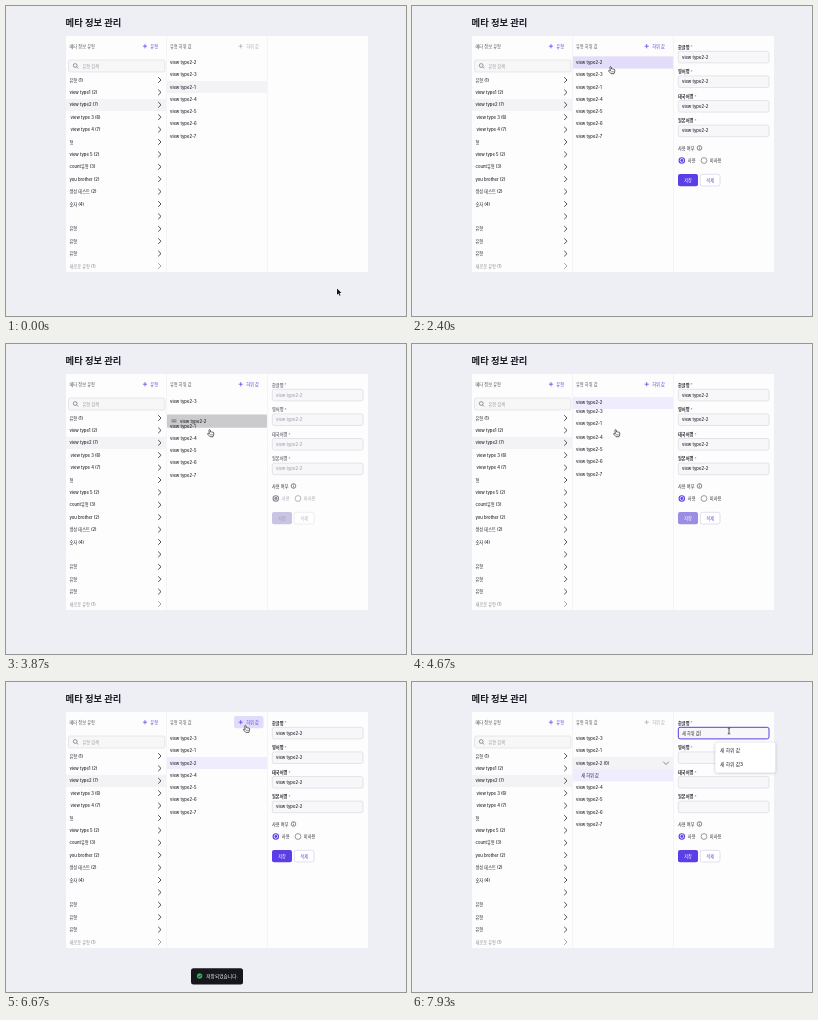
An HTML page with a canvas that plays this animation: 400x310 px, repeating every 8000 ms.

```html
<!DOCTYPE html>
<html lang="ko">
<head>
<meta charset="utf-8">
<style>
html, body { margin: 0; width: 100%; height: 100%; overflow: hidden; background: #eeeff5; }
canvas { display: block; width: 400px; height: 310px; }
</style>
</head>
<body>
<canvas id="stage"></canvas>
<script>
const LOOP = 8000;
const PURPLE = '#5b3ee6', INK = '#24252b', GREY = '#a9aab2', SHADE = '#f3f3f6';
const PICK = '#efecfd', PICK_HOVER = '#e3ddfa';
const FONT = 'Inter, "Noto Sans CJK KR", "Noto Sans CJK", sans-serif';
const ROW = 12.25, FIRST = 56.5;

// Moments of the story, in ms
const T = { pick: 2000, form: 2300, drag: 3530, drop: 4500, enable: 4560, sort: 4750,
            toast: 4780, press: 6470, add: 6850, toastEnd: 7080, focus: 7730, menu: 7800 };

const canvas = document.getElementById('stage');
const g = canvas.getContext('2d');
const dpr = window.devicePixelRatio || 1;
canvas.width = 400 * dpr;
canvas.height = 310 * dpr;

const clamp = v => Math.max(0, Math.min(1, v));
const ramp = (t, a, b) => clamp((t - a) / (b - a));
const lerp = (a, b, p) => a + (b - a) * p;
const smooth = p => p * p * (3 - 2 * p);
const easeOut = p => 1 - (1 - p) * (1 - p);

function mix(a, b, p) {
  const part = (c, i) => parseInt(c.slice(i, i + 2), 16);
  return `rgb(${[1, 3, 5].map(i => Math.round(lerp(part(a, i), part(b, i), p)))})`;
}

function text(s, x, y, color = INK, size = 4.2, weight = 500) {
  g.font = `${weight} ${size}px ${FONT}`;
  g.fillStyle = color;
  g.fillText(s, x, y + size * 0.36);
}

function rect(x, y, w, h, fill) {
  g.fillStyle = fill;
  g.fillRect(x, y, w, h);
}

function box(x, y, w, h, r, fill, stroke, width = 0.6) {
  g.beginPath();
  g.roundRect(x, y, w, h, r);
  if (fill) { g.fillStyle = fill; g.fill(); }
  if (stroke) { g.strokeStyle = stroke; g.lineWidth = width; g.stroke(); }
}

function line(points, color, width) {
  g.beginPath();
  points.forEach(([x, y]) => g.lineTo(x, y));
  g.strokeStyle = color;
  g.lineWidth = width;
  g.stroke();
}

function disc(x, y, r, fill, stroke, width) {
  g.beginPath();
  g.arc(x, y, r, 0, 7);
  if (fill) { g.fillStyle = fill; g.fill(); }
  if (stroke) { g.strokeStyle = stroke; g.lineWidth = width; g.stroke(); }
}

function plus(x, y, color) {
  line([[x - 2.1, y], [x + 2.1, y]], color, 0.75);
  line([[x, y - 2.1], [x, y + 2.1]], color, 0.75);
}

const path = [
  [70, 331, 282.5], [870, 203, 61], [1000, 203, 61], [1330, 198.5, 60.5],
  [3130, 198.5, 60.5], [3440, 203.5, 77], [3530, 203.5, 77], [3860, 203.5, 85.5],
  [4830, 203.5, 85.5], [5640, 236, 47], [5730, 236, 47], [6070, 239, 43.5],
  [6300, 239, 43.5], [6330, 239.3, 43.2], [7300, 239.3, 43.2], [7700, 317, 49]
];

function pointer(t) {
  const i = path.findIndex(k => k[0] > t);
  if (i < 0) return path[path.length - 1].slice(1);
  if (i === 0) return path[0].slice(1);
  const a = path[i - 1], b = path[i], p = smooth(ramp(t, a[0], b[0]));
  return [lerp(a[1], b[1], p), lerp(a[2], b[2], p)];
}

const types = ['유형 (1)', 'view type1 (2)', 'view type2 (7)', ' view type 3 (6)',
  ' view type 4 (7)', '형', 'view type 5 (2)', 'count유형 (3)', 'you brother (2)',
  '생성 테스트 (2)', '숫자 (4)', '', '유형', '유형', '유형', '새로운 유형 (1)'];

function drawTypes() {
  text('메타 정보 유형', 63.5, 40.3, '#55565e');
  plus(139, 40.2, PURPLE);
  text('유형', 144.3, 40.3, PURPLE);
  box(62.5, 54, 96.5, 12, 2, '#f7f7f8', '#d9d9de');
  disc(69.2, 59.5, 1.9, null, '#55565e', 0.6);
  line([[70.6, 60.9], [72.2, 62.5]], '#55565e', 0.6);
  text('유형 검색', 76.5, 60.2, '#9b9ca4');
  types.forEach((name, i) => {
    const y = 74 + i * 12.4;
    const color = i === types.length - 1 ? '#8f9097' : INK;
    if (i === 2) rect(60, y - 6, 100, 12.2, SHADE);
    text(name, 63.5, y, color);
    line([[152.2, y - 2.8], [155, y], [152.2, y + 2.8]], color, 0.8);
  });
}

function drawRow(name, y, fill, x = 164) {
  if (fill) rect(161, y - 6.1, 100, 12.2, fill);
  text(name, x, y);
}

function hoverAt(t, [x, y]) {
  if (t >= T.drag && t < T.sort) return -1;
  if (t > 3130 && t < T.drag) return t > 3250 ? 1 : 0;
  return x > 161 && x < 261 ? Math.floor((y - FIRST + ROW / 2) / ROW) : -1;
}

function drawValues(t, pos) {
  const live = ramp(t, T.pick, T.pick + 130) * (1 - ramp(t, T.add, T.add + 100));
  const hot = ramp(t, T.press, T.press + 130) * (1 - ramp(t, T.add, T.add + 130));
  const color = mix(GREY, PURPLE, live);
  text('유형 하위 값', 164, 40.3, '#55565e');
  if (hot) box(228, 34, 29.5, 12.3, 2, mix('#fdfdfe', '#e2dcfb', hot));
  plus(234.7, 40.2, color);
  text('하위 값', 240.2, 40.3, color);

  const label = n => 'view type2-' + n;
  const at = i => FIRST + i * ROW;
  const hover = hoverAt(t, pos);

  if (t < T.drag) {
    [2, 3, 1, 4, 5, 6, 7].forEach((n, i) => {
      let fill = i === hover || (n === 1 && t < 2270) ? SHADE : null;
      if (n === 2 && t >= T.pick) fill = mix(SHADE, PICK_HOVER, ramp(t, T.pick, T.pick + 130));
      drawRow(label(n), at(i), fill);
    });
  } else if (t < T.sort) {
    drawDrag(t, label, at);
  } else if (t < T.add) {
    [3, 1, 2, 4, 5, 6, 7].forEach((n, i) => {
      const fill = n === 2 ? (i === hover ? PICK_HOVER : PICK) : i === hover ? SHADE : null;
      drawRow(label(n), at(i), fill);
    });
  } else {
    [3, 1, 2, 0, 4, 5, 6, 7].forEach((n, i) => {
      if (n === 0) drawRow('새 하위 값', at(i), PICK, 169.3);
      else drawRow(label(n) + (n === 2 ? ' (0)' : ''), at(i), n === 2 ? SHADE : null);
    });
    line([[251.2, 79.7], [254, 82.5], [256.8, 79.7]], '#55565e', 0.7);
  }
}

function drawDrag(t, label, at) {
  const held = t < T.drop;
  const back = easeOut(ramp(t, T.drop, T.drop + 250));
  const up3 = easeOut(ramp(t, T.drag, T.drag + 200)) * (1 - back);
  const up1 = easeOut(ramp(t, 4000, 4200)) * (1 - back);
  const gap = held ? 1.2 * ramp(t, T.drag, T.drag + 80) : 0;
  const y = held
    ? lerp(67, 77, ramp(t, T.drag, 3870)) + 4 * smooth(ramp(t, 3930, 4150))
    : lerp(81, FIRST, back);

  if (held) box(161, y - 6.6, 100, 13.4, 1, '#cbcbce');
  else rect(161, y - 6.1, 100, 12.2, PICK);
  text(label(3), 164, at(1) - ROW * up3 + gap);
  text(label(1), 164, at(2) - ROW * up1 + gap);
  [4, 5, 6, 7].forEach((n, i) => text(label(n), 164, at(i + 3) + gap));
  if (held) {
    for (const d of [-1, 0.8]) line([[165.5, y + d], [170.5, y + d]], '#55565e', 0.8);
    text(label(2), 174, y);
  } else {
    text(label(2), 164, y);
  }
}

function drawForm(t) {
  if (t < T.form) return;
  g.globalAlpha = ramp(t, T.form - 60, T.form + 60);
  const off = ramp(t, T.drag + 20, T.drag + 150);
  const dim = t < T.enable ? off : 0;
  const fade = off * (1 - ramp(t, T.enable, T.enable + 270));
  const ink = mix(INK, '#a4a5ac', dim);
  const blank = t >= T.add;

  ['한글명', '영어명', '태국어명', '일본어명'].forEach((name, i) => {
    const y = 41 + i * 24.6;
    const focus = i === 0 && t >= T.focus;
    text(name, 266, y, mix(INK, '#77787f', dim), 4.2, 600);
    text('*', 266 + g.measureText(name + ' ').width, y, '#7d6fd0', 4);
    box(266.3, y + 4.3, 90.7, 11.6, 1.8, '#f7f7f9', focus ? PURPLE : '#d6d6dc', focus ? 1 : 0.6);
    const value = blank ? (i ? '' : '새 하위 값') : 'view type2-2';
    text(value, 270, y + 10.1, ink);
    if (focus) {
      const x = 270.6 + g.measureText(value).width;
      line([[x, y + 7.5], [x, y + 12.7]], INK, 0.5);
    }
  });

  text('사용 여부', 266, 142, INK, 4.2, 500);
  disc(287.5, 142, 2.3, null, '#3a3b42', 0.6);
  line([[287.5, 141.6], [287.5, 143.4]], '#3a3b42', 0.6);
  rect(287.2, 140.4, 0.6, 0.6, '#3a3b42');
  const dot = mix(PURPLE, '#85868e', dim);
  disc(269.8, 154.5, 2.7, '#ffffff', dot, 1.1);
  disc(269.8, 154.5, 1.4, dot);
  text('사용', 275.8, 154.6, ink);
  disc(292, 154.5, 2.9, '#ffffff', mix('#55565e', '#85868e', dim), 0.6);
  text('미사용', 297.8, 154.6, ink);
  box(266, 168, 20, 12.3, 2, mix(PURPLE, '#c9c4e2', fade));
  text('저장', 272.2, 174.1, mix('#ffffff', '#a29bc6', dim));
  box(288.3, 168.3, 19.7, 11.7, 2, '#ffffff', mix('#cfcbe6', '#e2e2e8', dim));
  text('삭제', 294.4, 174.1, mix(PURPLE, '#b3b0c4', dim));
  g.globalAlpha = 1;
}

function drawMenu(t) {
  if (t < T.menu) return;
  g.save();
  g.shadowColor = 'rgba(30,30,50,.28)';
  g.shadowBlur = 3 * dpr;
  g.shadowOffsetY = dpr * 0.6;
  box(303.3, 60.5, 60.2, 30.2, 2, '#ffffff');
  g.restore();
  text('새 하위 값', 308, 68.7, INK, 4.75);
  text('새 하위 값3', 308, 82.6, INK, 4.75);
}

function drawToast(t) {
  const shown = ramp(t, T.toast, T.toast + 200) * (1 - ramp(t, T.toastEnd, T.toastEnd + 180));
  if (!shown) return;
  g.globalAlpha = shown;
  box(185, 286.2, 52, 16.2, 2.5, '#15171c');
  disc(193.6, 294, 2.7, '#35a853');
  line([[192.3, 294.1], [193.3, 295.1], [195, 293.1]], '#15171c', 0.6);
  text('저장되었습니다.', 200.3, 294.2, '#f4f4f6', 4.7, 400);
  g.globalAlpha = 1;
}

const ARROW = new Path2D('M0 0V6.3L1.5 5L2.5 7.3L3.5 6.9L2.5 4.6H4.5Z');
const HAND = new Path2D('M-.6 .6Q0-.4.7 .5L1.1 2.5Q1.7 2 2.2 2.6Q2.9 2.2 3.3 2.9Q4.2 2.6 4.3 3.5' +
  'L4.2 5.2L3.5 7.2H.5L-1.6 4.9Q-2.3 4-1.3 3.7L-.1 4.4Z');

function drawPointer(t, [x, y]) {
  const inside = (l, top, r, b) => x >= l && x <= r && y >= top && y <= b;
  g.save();
  g.translate(x, y);
  g.lineJoin = 'round';
  if (inside(161, 50, 261, 136) || inside(228, 34, 257, 46.5)) {
    g.fillStyle = '#fff';
    g.fill(HAND);
    g.strokeStyle = '#15161a';
    g.lineWidth = 0.65;
    g.stroke(HAND);
    for (const d of [1.1, 2.1, 3.1]) line([[d, 4.5], [d, 5.9]], '#15161a', 0.35);
  } else if (t > T.add && inside(266, 45, 357, 57)) {
    line([[0, -2.8], [0, 2.8]], '#15161a', 0.7);
    for (const d of [-3, 3]) line([[-1.3, d], [0, d * 0.9], [1.3, d]], '#15161a', 0.6);
  } else {
    g.strokeStyle = '#fff';
    g.lineWidth = 1;
    g.stroke(ARROW);
    g.fillStyle = '#101114';
    g.fill(ARROW);
  }
  g.restore();
}

function draw(t) {
  const pos = pointer(t);
  g.setTransform(dpr, 0, 0, dpr, 0, 0);
  rect(0, 0, 400, 310, '#eeeff5');
  text('메타 정보 관리', 59.6, 16.2, '#1b1c21', 9.3, 700);
  rect(60, 30, 302, 236, '#fdfdfe');
  for (const x of [160.2, 261.2]) rect(x, 30, 0.6, 236, '#eeeef2');
  drawTypes();
  drawValues(t, pos);
  drawForm(t);
  drawMenu(t);
  drawToast(t);
  drawPointer(t, pos);
}

const start = performance.now();
function tick() {
  draw((performance.now() - start) % LOOP);
  requestAnimationFrame(tick);
}
tick();
</script>
</body>
</html>
```
